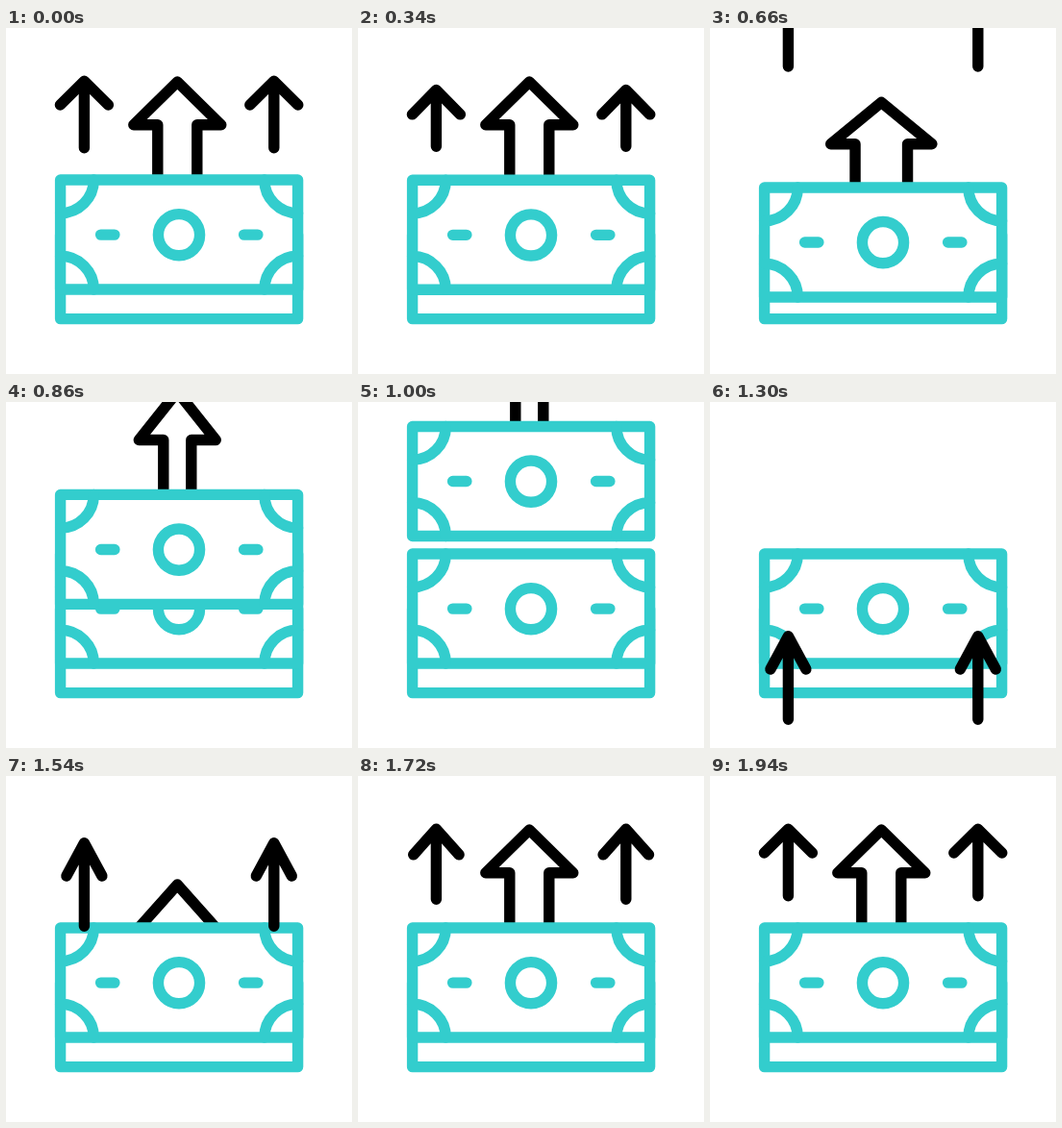
These frames come from a looping animation (360x360 px, 2.42 s). An HTML page:

```html
<!DOCTYPE html>
<html lang="en">
<head>
<meta charset="utf-8">
<title>Money rising</title>
<style>
  html, body { margin: 0; width: 100%; height: 100%; overflow: hidden; background: #fff; }
  svg { display: block; width: 100vw; height: 100vh; }
  .line { fill: none; stroke-width: 11.4; stroke-linecap: round; stroke-linejoin: round; }
  .teal { stroke: #33cdcd; }
  .black { stroke: #000; }
  .white { fill: #fff; }
</style>
</head>
<body>
<svg viewBox="0 0 360 360">
  <defs>
    <g id="note" class="line teal">
      <path class="white" d="M56.6 158H303.6V272H56.6Z"/>
      <path d="M91.3 158A34.7 34.7 0 0 1 56.6 192.7M268.9 158A34.7 34.7 0 0 0 303.6 192.7
               M91.3 272A34.7 34.7 0 0 0 56.6 237.3M268.9 272A34.7 34.7 0 0 1 303.6 237.3"/>
      <circle cx="180" cy="215.2" r="21.6"/>
      <path d="M98.6 215.1h14.3M247.6 215.1h14.3"/>
    </g>
  </defs>
  <path id="big" class="line black"/>
  <path class="line teal white" d="M56.6 215V302.6H303.6V215"/>
  <use id="next" href="#note"/>
  <use id="top" href="#note"/>
  <path id="sides" class="line black"/>
</svg>
<script>
const LOOP = 2420, STEP = 20;
const el = id => document.getElementById(id);
const ramp = (t, from, to) => Math.min(1, Math.max(0, (t - from) / (to - from)));

// Each part sinks by dip from start to leave, flies off, then re-enters at back and lands.
const SIDE = { start: 20, dip: 12, leave: 440, speed: 0.517, back: 1140, land: 1560, backSpeed: 0.725, relax: [1560, 1760] };
const BIG = { start: 340, dip: 24, leave: 700, speed: 0.567, back: 1350, land: 1703, backSpeed: 0.35, relax: [1400, 1700] };
const TOP = { start: 330, dip: 9.4, leave: 720, speed: 0.507, back: 1300, land: 1300, backSpeed: 0 };
const REVEAL = 740;

function offset(p, t) {
  if (t >= p.back) return p.backSpeed * Math.max(0, p.land - t);
  return p.dip * ramp(t, p.start, p.leave) - p.speed * Math.max(0, t - p.leave);
}

function strain(p, t) {
  const launch = ramp(t, p.leave, p.leave + 100);
  return {
    squash: ramp(t, p.start, p.leave) - launch,
    stretch: launch - ramp(t, ...p.relax)
  };
}

function sideArrow(x, t) {
  const { squash, stretch } = strain(SIDE, t);
  const tip = 55.3 + offset(SIDE, t);
  const half = 25 - 6.5 * stretch;
  const neck = tip + 24.7 + squash + 9.5 * stretch;
  const end = tip + 69.5 - 14 * squash + 17 * stretch;
  return `M${x - half} ${neck}L${x} ${tip}L${x + half} ${neck}M${x} ${tip}V${end}`;
}

function bigArrow(x, t) {
  const { squash, stretch } = strain(BIG, t);
  const tip = 56 + offset(BIG, t);
  const half = 45.5 + 8 * squash - 5.5 * stretch;
  const shaft = 20.5 + 7.6 * squash - 6 * stretch;
  const neck = tip + 44.7 - 1.5 * squash + 5.5 * stretch;
  const end = tip + 118;
  return `M${x - shaft} ${end}V${neck}H${x - half}L${x} ${tip}L${x + half} ${neck}H${x + shaft}V${end}`;
}

const shift = (id, dy) => el(id).setAttribute('transform', `translate(0 ${dy})`);

function draw(t) {
  el('sides').setAttribute('d', sideArrow(81.4, t) + sideArrow(278.8, t));
  el('big').setAttribute('d', bigArrow(178.3, t));
  shift('top', offset(TOP, t));
  shift('next', 30 * (1 - ramp(t, REVEAL, REVEAL + 60)));
  el('next').style.display = t >= REVEAL && t < TOP.back ? '' : 'none';
}

const begin = performance.now();
function tick() {
  const t = (performance.now() - begin) % LOOP;
  draw(Math.floor(t / STEP) * STEP);
  requestAnimationFrame(tick);
}
tick();
</script>
</body>
</html>
```
